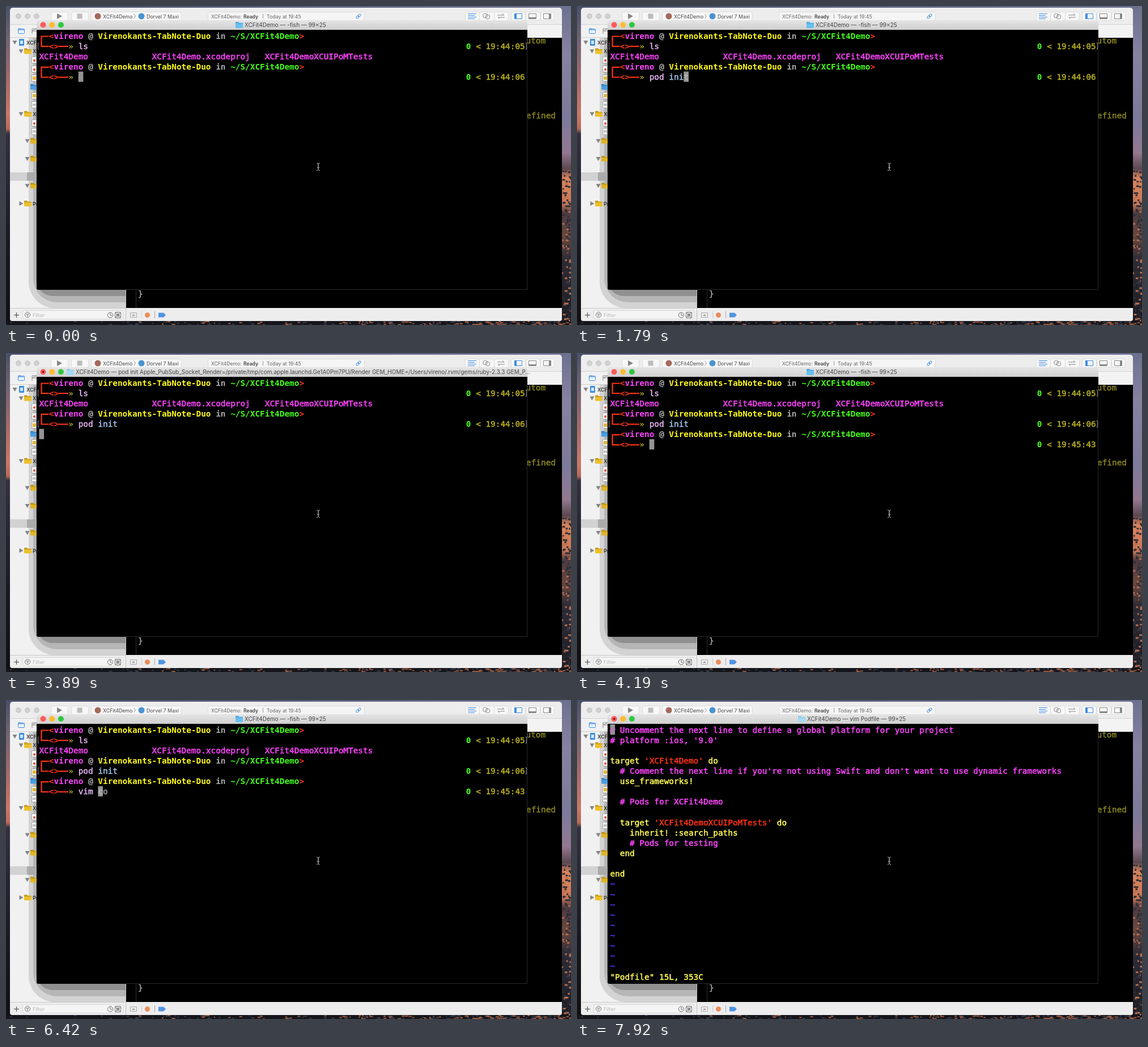
Recreate the animation shown at these times as an HTML page with a canvas. Size 997 by 562 pixels, loop 8 s.

```html
<!DOCTYPE html>
<html lang="en">
<head>
<meta charset="utf-8">
<title>Terminal session</title>
<style>
html, body { margin: 0; width: 100%; height: 100%; overflow: hidden; background: #000; }
canvas { display: block; width: 100vw; height: 100vh; }
</style>
</head>
<body>
<canvas width="997" height="562"></canvas>
<script>
const ctx = document.querySelector("canvas").getContext("2d");
const LOOP = 8000, CELL = 8.66, ROW = 18.13, LEFT = 58.4, TOP = 43;
const C = {
  red: "#ff3418", magenta: "#ff45ff", yellow: "#fffb1a", green: "#45ff1c", olive: "#b3ab20",
  grey: "#aaaaaa", command: "#e2b2ee", param: "#a3c8f0", error: "#dd5a5a", hint: "#9c9ca0",
  cursor: "#939393", code: "#fffb55", tilde: "#4a35ff"
};

// ---- drawing helpers ----
function rect(x, y, w, h, fill, radius = 0, stroke) {
  ctx.beginPath();
  ctx.roundRect(x, y, w, h, radius);
  if (fill) { ctx.fillStyle = fill; ctx.fill(); }
  if (stroke) { ctx.strokeStyle = stroke; ctx.lineWidth = 1; ctx.stroke(); }
}
function disc(x, y, r, fill, stroke) {
  ctx.beginPath();
  ctx.arc(x, y, r, 0, 7);
  if (fill) { ctx.fillStyle = fill; ctx.fill(); }
  if (stroke) { ctx.strokeStyle = stroke; ctx.lineWidth = 1; ctx.stroke(); }
}
function line(color, width, ...pts) {
  ctx.beginPath();
  for (let i = 0; i < pts.length; i += 2) ctx.lineTo(pts[i], pts[i + 1]);
  ctx.strokeStyle = color;
  ctx.lineWidth = width;
  ctx.stroke();
}
function poly(fill, ...pts) {
  ctx.beginPath();
  for (let i = 0; i < pts.length; i += 2) ctx.lineTo(pts[i], pts[i + 1]);
  ctx.fillStyle = fill;
  ctx.fill();
}
function label(text, x, y, size, color = "#444", weight = 400) {
  ctx.font = `${weight} ${size}px Inter, sans-serif`;
  ctx.fillStyle = color;
  ctx.fillText(text, x, y);
}
function gradient(x, y, w, h, stops, radius) {
  const g = ctx.createLinearGradient(0, y, 0, y + h);
  stops.forEach(([at, color]) => g.addColorStop(at, color));
  rect(x, y, w, h, g, radius);
}
function folder(x, y, w, h, color, edge) {
  rect(x, y, w * .45, h * .5, edge, 1);
  rect(x, y + h * .14, w, h * .86, color, 1);
  rect(x, y + h * .22, w, 1, edge);
}
// Regular text gets a thin outline for a medium weight.
function monospace(text, x, y, color, bold) {
  ctx.font = `${bold ? "bold " : ""}14.4px "DejaVu Sans Mono", monospace`;
  ctx.fillStyle = ctx.strokeStyle = color;
  ctx.lineWidth = .5;
  [...text].forEach((ch, i) => {
    ctx.fillText(ch, x + i * CELL, y);
    if (!bold) ctx.strokeText(ch, x + i * CELL, y);
  });
}
const cells = (text, col, row, color, bold) =>
  monospace(text, LEFT + col * CELL, TOP + row * ROW + 14.5, color, bold);

// ---- desktop and editor window behind the terminal ----
function drawDesktop() {
  gradient(0, 0, 500, 562, [[0, "#49506a"], [.1, "#6f6473"], [.22, "#a06a6c"], [.34, "#c87868"],
    [.385, "#b86a5c"], [.4, "#353040"], [.55, "#262836"], [.75, "#181920"], [1, "#101014"]]);
  gradient(500, 0, 497, 562, [[0, "#6c7190"], [.15, "#8682a0"], [.35, "#7c7a9c"], [.46, "#937890"],
    [.51, "#5a4850"], [.54, "#d9845c"], [.62, "#c97856"], [.65, "#4a3a40"], [.72, "#6a483f"],
    [.8, "#2c2a34"], [1, "#1c1b22"]]);
  const top = ctx.createLinearGradient(0, 0, 997, 0);
  top.addColorStop(0, "#49506a");
  top.addColorStop(1, "#6c7190");
  rect(0, 0, 997, 4, top);
  rect(0, 555, 997, 7, "#15161c");
  let seed = 7;
  const random = () => (seed = seed * 16807 % 2147483647) / 2147483647;
  for (let i = 0; i < 220; i++) {
    const x = 997 * Math.sqrt(random()), warm = random() < x / 1400;
    rect(x, 555 + random() * 7, 2 + random() * 5, 2, warm ? "#9a5a40" : "#343a4a");
  }
  for (let i = 0; i < 130; i++) {
    const y = 290 + random() * 265, warm = random() < .35;
    rect(981 + random() * 14, y, 2 + random() * 3, 3, warm ? "#b87050" : "#2c2e3a");
  }
}

function drawToolbar() {
  rect(7, 3, 974, 53, "#eeedee", [5, 5, 0, 0]);
  [22, 38, 54].forEach(x => disc(x, 18, 4.3, "#d2d1d2", "#c2c1c2"));
  const button = (x, w) => rect(x + .5, 10.5, w, 15, "#f7f7f7", 3, "#dddcdd");
  button(79, 30); button(115, 30); button(150, 159);
  poly("#858585", 90, 13, 99, 18, 90, 23);
  rect(125.5, 13.5, 9, 9, "#bcbcbc");
  disc(162, 18, 5.5, "#a5695c");
  label("XCFit4Demo", 171, 21.5, 8.8, "#4a4a4a");
  line("#999", 1, 225.5, 14, 228.5, 18, 225.5, 22);
  disc(239, 18, 5.5, "#4a93d2");
  label("Dorvel 7 Maxi", 248, 21.5, 8.8, "#4a4a4a");

  rect(356.5, 10.5, 276, 15, "#f5f5f5", 3, "#dcdbdc");
  label("XCFit4Demo:", 362, 21.5, 8.6, "#666");
  label("Ready", 419, 21.5, 8.6, "#444", 600);
  line("#999", 1, 453.5, 14, 453.5, 22);
  label("Today at 19:45", 460, 21.5, 8.8, "#666");
  ctx.save();
  ctx.translate(622, 18);
  ctx.rotate(-.75);
  rect(-5, -1.8, 5.5, 3.6, null, 1.8, "#4a90e2");
  rect(-.5, -1.8, 5.5, 3.6, null, 1.8, "#4a90e2");
  ctx.restore();

  [[810, 25], [835, 26], [861, 25], [891, 25], [917, 25], [943, 24]].forEach(b => button(...b));
  [13.5, 16.5, 19.5, 22.5].forEach((y, i) => line("#3f8ae0", 1, 815, y, i % 2 ? 827 : 830, y));
  disc(845.5, 17, 3.8, null, "#888");
  disc(850, 19, 3.8, null, "#888");
  line("#888", 1, 867, 16, 879, 16, 876, 13.5);
  line("#888", 1, 880, 20, 868, 20, 871, 22.5);
  const panel = (x, color, bar) => {
    rect(x + .5, 13.5, 13, 9, null, 0, color);
    rect(...bar, color);
  };
  panel(897, "#3f8ae0", [897, 13, 4, 10]);
  panel(922, "#888", [922, 20, 14, 2]);
  panel(948, "#888", [958, 13, 3, 10]);
  line("#d4d3d4", 1, 7, 32.5, 981, 32.5);
}

function disclosure(x, y, open = true) {
  open ? poly("#848484", x - 4, y - 3, x + 4, y - 3, x, y + 4)
       : poly("#848484", x - 3, y - 4, x - 3, y + 4, x + 4, y);
}
function drawNavigator() {
  rect(7, 33, 205, 500, "#f1f1f1");
  ctx.save();
  ctx.beginPath();
  ctx.rect(7, 56, 205, 476);
  ctx.clip();
  rect(7, 293, 48, 15, "#d2d2d2");
  rect(40, 0, 400, 532, "#d3d3d3", 46);
  rect(48, 0, 400, 522, "#b6b6b6", 42);
  rect(53, 0, 400, 511, "#909090", 30);
  rect(37, 293, 18, 15, "#ababab");
  ctx.restore();
  line("#cfcfcf", 1, 7, 55.5, 55, 55.5);
  folder(21.5, 39.5, 11, 9, "#eaf4ff", "#3f8ae0");
  rect(21.5, 40.5, 11, 8, null, 1, "#3f8ae0");
  line("#888", 1, 46, 49, 46, 40, 54, 40, 46, 44, 54, 44);

  disclosure(15.5, 64);
  rect(23, 58, 9, 12, "#3c8edc", 1);
  rect(25, 61, 5, 6, "#cfe5fa");
  label("XCFit4Demo", 36, 67.5, 9, "#333", 600);
  [[79.5, true, "XCFit4Demo"], [190, true, "XCFit4Demo"], [348, false, "Products"]].forEach(([y, open, name]) => {
    disclosure(26.5, y, open);
    folder(32, y - 5, 13, 10, "#ecc02c", "#bd911a");
    label(name, 47, y + 3.5, 9, "#333", 600);
  });
  [95, 111, 127, 158, 174, 206, 221].forEach((y, i) => {
    rect(45.5, y - 5.5, 8, 11, "#fafafa", 0, "#a9a9a9");
    if (i === 2 || i === 3) rect(47, y - 3, 6, 6, "#e1b53a");
    else if (i === 4 || i === 6) rect(47, y - 2, 6, 4, "#c0c0c0");
    else disc(50, y + 1, 2.2, "#dd5b42");
  });
  folder(43, 137.5, 12, 10, "#4c9ee0", "#2b78be");
  [237.5, 269, 316.5].forEach(y => {
    disclosure(37.5, y);
    folder(43, y - 5, 13, 10, "#dfb428", "#b08814");
  });
}

function drawEditor() {
  rect(212, 56, 769, 477, "#000");
  rect(920, 33, 61, 23, "#f3f3f3");
  monospace("utom", 917.5, 65.5, "#8c8620");
  monospace("efined", 918, 198, "#8c8620");
  line("#303030", 1, 229.5, 500, 229.5, 532);
  monospace("}", 233, 512, "#a0a0a0");

  rect(7, 532, 974, 23, "#eeedee", [0, 0, 4, 4]);
  line("#c9c9c9", 1, 7, 532.5, 212, 532.5);
  line("#c4c4c4", 1, 211.5, 500, 211.5, 555);
  line("#555", 1.2, 14, 544.5, 23, 544.5);
  line("#555", 1.2, 18.5, 540, 18.5, 549);
  rect(29.5, 536.5, 177, 15, "#f5f5f5", 3, "#d5d5d5");
  disc(38, 544, 4.6, null, "#777");
  [[542.5, 2.7], [544.5, 1.8], [546.5, .8]].forEach(([y, w]) => line("#777", 1, 38 - w, y, 38 + w, y));
  label("Filter", 47, 547.5, 9, "#b9b9b9");
  disc(184, 544.5, 4.6, null, "#666");
  line("#666", 1, 184, 541, 184, 545, 187, 545);
  rect(192.5, 539.5, 10, 10, null, 1, "#666");
  rect(195.5, 542.5, 4, 4, null, 0, "#666");
  line("#666", 1, 193, 540, 202, 549);
  line("#666", 1, 202, 540, 193, 549);
  rect(219.5, 540.5, 11, 8, null, 0, "#aaa");
  poly("#999", 222, 546, 225, 543, 228, 546);
  line("#ccc", 1, 239.5, 538, 239.5, 550);
  disc(249.5, 544.5, 4.5, "#e98c5c");
  line("#aaa", 1, 262.5, 538, 262.5, 550);
  poly("#5093e3", 269, 540.5, 278, 540.5, 282, 544.5, 278, 548.5, 269, 548.5);
}

// ---- terminal ----
const TITLES = [
  [0, 421, "XCFit4Demo — -fish — 99×25"],
  [2540, 291, "XCFit4Demo — ruby_executable_hooks ~/.rvm/gems/ruby-2.3.3/bin/pod init — 99×25"],
  [3890, 123, "XCFit4Demo — pod init Apple_PubSub_Socket_Render=/private/tmp/com.apple.launchd.Ge1A0Pm7PU/Render GEM_HOME=/Users/vireno/.rvm/gems/ruby-2.3.3 GEM_P…"],
  [4190, 421, "XCFit4Demo — -fish — 99×25"],
  [7920, 406, "XCFit4Demo — vim Podfile — 99×25"]
];
const POD_TYPING = [[0, ""], [300, "p"], [600, "pod"], [750, "pod "], [1350, "pod i"],
  [1490, "pod in"], [1640, "pod ini"], [1940, "pod init"]];
const VIM_TYPING = [[4190, ""], [5530, "v"], [5980, "vi"], [6270, "vim"], [6420, "vim "],
  [7020, "vim P"], [7170, "vim Po"], [7470, "vim Podfile "]];
const POD_ENTER = 2390, POD_DONE = 4190, VIM_ENTER = 7770, VIM_OPEN = 7920;
const HISTORY = ["pod install", "pod init", "vim co", "vim Podfile"];
const VALID = ["ls", "pod", "vi", "vim"];
const latest = (steps, t) => steps.findLast(step => step[0] <= t);

function drawWindow(t) {
  rect(54, 40, 866, 460, "#000", [0, 0, 3, 3]);
  line("#2a2a2a", 1, 212, 499.5, 919.5, 499.5, 919.5, 56);
  gradient(54, 25, 866, 17, [[0, "#e6e5e6"], [1, "#d0cfd0"]], [5, 5, 0, 0]);
  ["#fc5b57", "#fdbc2f", "#2fc840"].forEach((color, i) => disc(65.5 + 15.7 * i, 33.3, 5, color));
  const [start, x, text] = latest(TITLES, t);
  const busy = start && start !== POD_DONE;
  if (busy) disc(65.5, 33.3, 1.8, "#7c0c08");
  folder(x - 16, 28, 13, 11, busy ? "#a5d9f2" : "#68c0f0", busy ? "#8ccbe8" : "#46a5dc");
  label(text, x, 37.2, 10, "#454545");
}

function cursor(col, row) {
  rect(LEFT + col * CELL, TOP + row * ROW, CELL, ROW, C.cursor);
}

function prompt(row, time) {
  const y = TOP + row * ROW + 10.5, y2 = y + ROW - .5;
  line(C.red, 2.2, 75.5, y, 62.5, y, 62.5, y2, 75.5, y2);
  line(C.red, 2.2, 93, y2, 110, y2);
  cells("<", 2, row, C.red, true);
  cells("vireno", 3, row, C.magenta, true);
  cells("@", 10, row, C.grey);
  cells("Virenokants-TabNote-Duo", 12, row, C.yellow, true);
  cells("in", 36, row, C.grey, true);
  cells("~/S/XCFit4Demo", 39, row, C.green, true);
  cells(">", 53, row, C.red, true);
  cells("<>", 2, row + 1, C.red, true);
  cells("»", 6, row + 1, C.olive, true);
  cells("0", 87, row + 1, C.green, true);
  cells("< " + time, 89, row + 1, C.olive);
}

function command(row, typed, entered) {
  const word = typed.split(" ")[0];
  if (entered) {
    const y = TOP + row * ROW + 4;
    line("#8a8a8a", 1, 58, y, 56.5, y, 56.5, y + 11, 58, y + 11);
    line("#8a8a8a", 1, 916.5, y, 918.5, y, 918.5, y + 11, 916.5, y + 11);
  } else cursor(8 + typed.length, row);
  cells(word, 8, row, VALID.includes(word) ? C.command : C.error);
  cells(typed.slice(word.length), 8 + word.length, row, C.param);
  if (entered || !typed) return;
  const hint = (HISTORY.find(h => h.startsWith(typed)) || typed).slice(typed.length);
  cells(hint.slice(0, 1), 8 + typed.length, row, "#bababa");
  cells(hint.slice(1), 9 + typed.length, row, C.hint);
}

function drawShell(t) {
  prompt(0, "19:44:05");
  command(1, "ls", true);
  cells("XCFit4Demo", 0, 2, C.magenta);
  cells("XCFit4Demo.xcodeproj", 23, 2, C.magenta);
  cells("XCFit4DemoXCUIPoMTests", 46, 2, C.magenta);
  prompt(3, "19:44:06");
  command(4, latest(POD_TYPING, t)[1], t >= POD_ENTER);
  if (t >= POD_DONE) {
    prompt(5, "19:45:43");
    command(6, latest(VIM_TYPING, t)[1], t >= VIM_ENTER);
    if (t >= VIM_ENTER) cursor(0, 7);
  } else if (t >= POD_ENTER) cursor(0, 5);
}

const PODFILE = `# Uncomment the next line to define a global platform for your project
# platform :ios, '9.0'

target 'XCFit4Demo' do
  # Comment the next line if you're not using Swift and don't want to use dynamic frameworks
  use_frameworks!

  # Pods for XCFit4Demo

  target 'XCFit4DemoXCUIPoMTests' do
    inherit! :search_paths
    # Pods for testing
  end

end`.split("\n");

function drawVim() {
  PODFILE.forEach((text, row) => {
    const comment = text.trim().startsWith("#");
    let col = 0;
    for (const part of comment ? [text] : text.split(/('.*?')/)) {
      cells(part, col, row, comment ? C.magenta : part[0] === "'" ? C.red : C.code);
      col += part.length;
    }
  });
  for (let row = PODFILE.length; row < 24; row++) cells("~", 0, row, C.tilde);
  cells('"Podfile" 15L, 353C', 0, 24, C.code);
  cursor(0, 0);
  cells("#", 0, 0, "#b77ab7");
}

function drawPointer() {
  const x = 551, shape = [x - 3, 277, x - 1, 277, x, 278, x, 288.5, x - 1, 289.5, x - 3, 289.5];
  const mirrored = shape.map((v, i) => i % 2 ? v : 2 * x - v);
  line("#a8a8a8", 1, ...shape);
  line("#a8a8a8", 1, ...mirrored);
  line("#a8a8a8", 1, x - 2, 284.5, x + 2, 284.5);
}

function frame() {
  const t = performance.now() % LOOP;
  drawDesktop();
  drawToolbar();
  drawNavigator();
  drawEditor();
  drawWindow(t);
  t < VIM_OPEN ? drawShell(t) : drawVim();
  drawPointer();
  requestAnimationFrame(frame);
}
frame();
</script>
</body>
</html>
```
